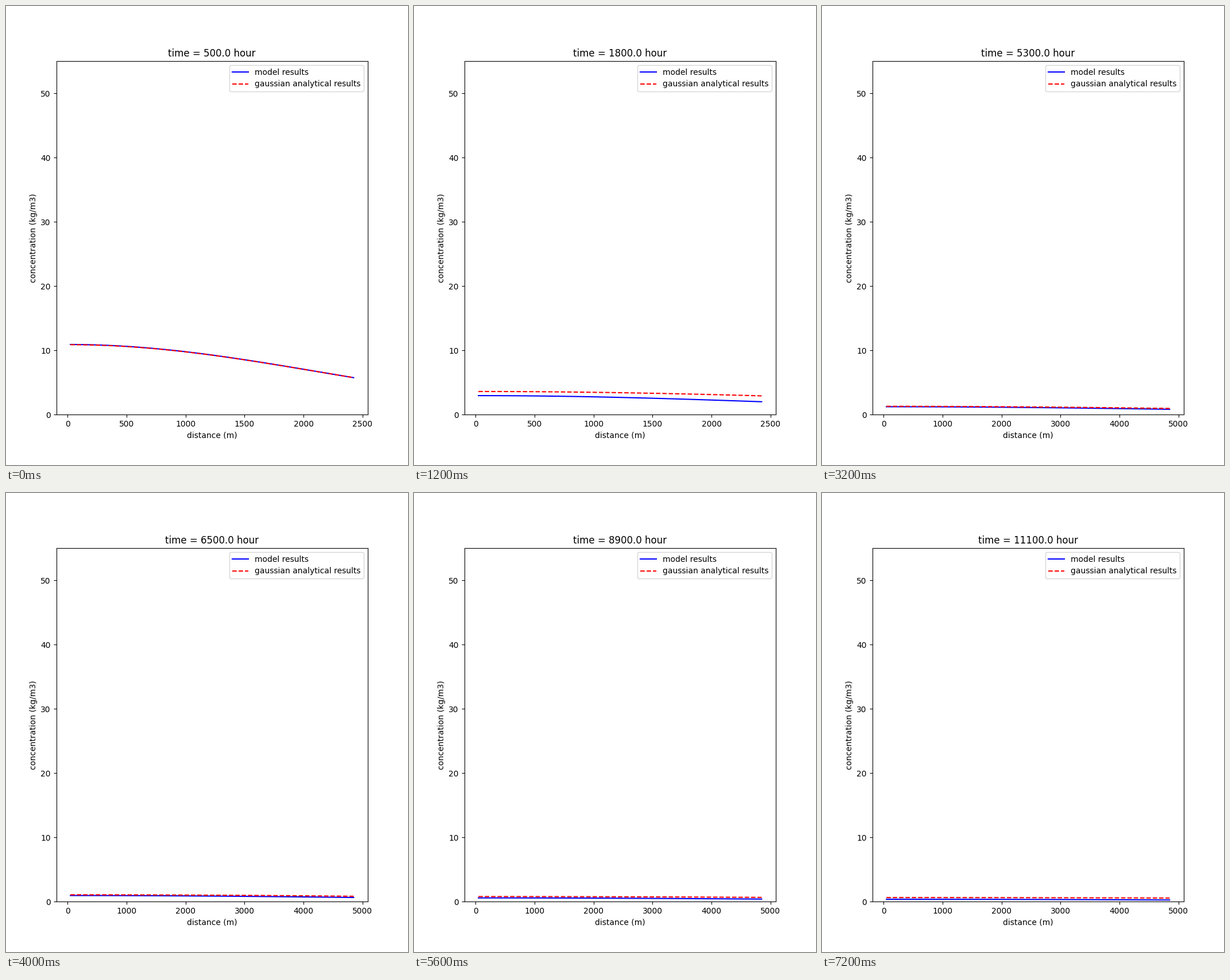
Recreate the animation shown at these times as a matplotlib script. Size 700 px wide and 800 px high, loop 7.6 s.

```python
import numpy as np
import matplotlib.pyplot as plt
from matplotlib.animation import FuncAnimation

# Radial spreading of a Gaussian cloud, diffusivity 1 m2/s
PEAK = 50.0                # initial peak, kg/m3
AGE = 5e5 / 3600           # age of the initial cloud, hours
SPREAD = 4 * 3600          # 4 D in m2/hour

# The grid doubles its cell size after 1800 hours
TIMES = [500, 1100, 1700, 1800, *range(2900, 10701, 600), 11100]
COARSE_FROM = 2900


def analytical(x, hours):
    age = hours + AGE
    return PEAK * AGE / age * np.exp(-x**2 / (SPREAD * age))


def model(x, hours, scale):
    """Cloud losing mass through the open edge of the grid."""
    # The fine grid behaves like the coarse one at a rescaled age
    t = (hours + AGE) * (2 / scale) ** 2 - AGE
    leaking = 1.04 * np.exp(-2.1e-4 * (t - 4100)) * (2 / scale) ** 2
    edge = min(leaking, analytical(x[-1], hours))
    ratio = 0.677 - 0.093 * np.exp(-(t - 2900) / 1000)
    return edge / ratio * ratio ** ((x / x[-1]) ** 2)


fig, ax = plt.subplots(figsize=(7, 8), dpi=100)
model_line, = ax.plot([], [], "b-", label="model results")
exact_line, = ax.plot([], [], "r--", label="gaussian analytical results")
ax.set_ylim(0, 55)
ax.set_xlabel("distance (m)")
ax.set_ylabel("concentration (kg/m3)")
ax.legend(loc="upper right")
title = ax.set_title("")


def update(frame):
    hours = TIMES[frame]
    scale = 2 if hours >= COARSE_FROM else 1
    x = scale * np.arange(25, 2426, 50)
    model_line.set_data(x, model(x, hours, scale))
    exact_line.set_data(x, analytical(x, hours))
    ax.set_xlim(-95 * scale, 2545 * scale)
    title.set_text(f"time = {hours:.1f} hour")
    return model_line, exact_line, title


anim = FuncAnimation(fig, update, frames=len(TIMES), interval=400,
                     repeat=True, repeat_delay=0, blit=False)
plt.show()
```
